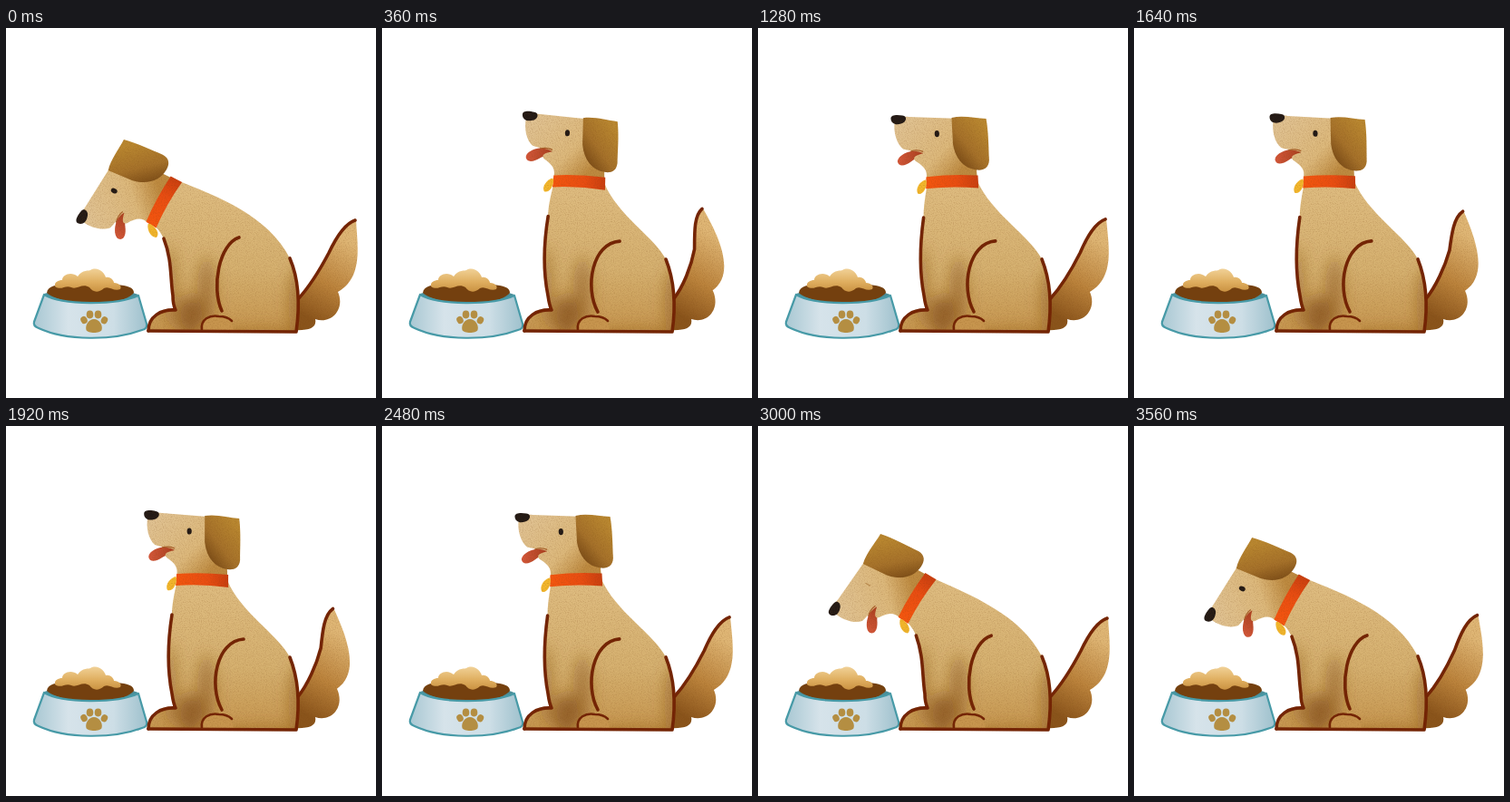
Recreate the animation shown at these times as an HTML page. Size 408x408 px, loop 3.6 s.

```html
<!DOCTYPE html>
<html lang="en">
<head>
<meta charset="utf-8">
<title>Dog and bowl</title>
<style>
html, body { margin: 0; width: 100%; height: 100%; overflow: hidden; background: #fff; }
svg { display: block; width: 100vw; height: 100vh; }
.line { fill: none; stroke: #742405; stroke-width: 3.6; stroke-linecap: round; stroke-linejoin: round; }
.soft { filter: url(#blur); }
</style>
</head>
<body>
<svg viewBox="0 0 408 408">
  <defs>
    <filter id="blur" x="-60%" y="-60%" width="220%" height="220%"><feGaussianBlur stdDeviation="8"/></filter>
    <filter id="grain" filterUnits="userSpaceOnUse" x="0" y="0" width="408" height="408" color-interpolation-filters="sRGB">
      <feTurbulence type="fractalNoise" baseFrequency="0.9" numOctaves="2" seed="4"/>
      <feColorMatrix values="0 0 0 0 .45  0 0 0 0 .25  0 0 0 0 .05  .45 0 0 0 -.2"/>
      <feComposite in2="SourceAlpha" operator="in" result="dots"/>
      <feMerge><feMergeNode in="SourceGraphic"/><feMergeNode in="dots"/></feMerge>
    </filter>
    <linearGradient id="coat" x1="0" y1="165" x2="0" y2="335" gradientUnits="userSpaceOnUse">
      <stop offset="0" stop-color="#dfbd82"/><stop offset=".6" stop-color="#d5b06f"/><stop offset="1" stop-color="#c6964f"/>
    </linearGradient>
    <linearGradient id="face" x1="165" y1="100" x2="225" y2="160" gradientUnits="userSpaceOnUse">
      <stop offset="0" stop-color="#e0c292"/><stop offset=".65" stop-color="#dcb87b"/><stop offset="1" stop-color="#bd8a40"/>
    </linearGradient>
    <linearGradient id="earFill" x1="219" y1="140" x2="256" y2="112" gradientUnits="userSpaceOnUse">
      <stop offset="0" stop-color="#7d4e18"/><stop offset=".4" stop-color="#a5712a"/><stop offset="1" stop-color="#b98730"/>
    </linearGradient>
    <linearGradient id="tailFill" x1="330" y1="318" x2="378" y2="235" gradientUnits="userSpaceOnUse">
      <stop offset="0" stop-color="#8a541b"/><stop offset=".45" stop-color="#bb833c"/><stop offset="1" stop-color="#dfb675"/>
    </linearGradient>
    <linearGradient id="tongueFill" x1="186" y1="0" x2="157" y2="0" gradientUnits="userSpaceOnUse">
      <stop offset="0" stop-color="#a8401f"/><stop offset="1" stop-color="#d4573a"/>
    </linearGradient>
    <linearGradient id="strap" x1="187" y1="0" x2="245" y2="0" gradientUnits="userSpaceOnUse">
      <stop offset="0" stop-color="#f4560f"/><stop offset=".6" stop-color="#e94d12"/><stop offset="1" stop-color="#c93f10"/>
    </linearGradient>
    <linearGradient id="bowlFill" x1="31" y1="0" x2="156" y2="0" gradientUnits="userSpaceOnUse">
      <stop offset="0" stop-color="#a9c8d3"/><stop offset=".3" stop-color="#d6e3ea"/><stop offset=".7" stop-color="#cddee6"/><stop offset="1" stop-color="#9dc0cc"/>
    </linearGradient>
    <linearGradient id="cream" x1="0" y1="266" x2="0" y2="294" gradientUnits="userSpaceOnUse">
      <stop offset="0" stop-color="#f0d095"/><stop offset=".5" stop-color="#dfae5f"/><stop offset="1" stop-color="#c48a3a"/>
    </linearGradient>
    <clipPath id="inBody"><use href="#body"/></clipPath>
  </defs>

  <g id="bowl">
    <path d="M42 293C70 285 120 285 146 294L144 303C110 308 70 306 43 299Z" fill="#4b8f9a"/>
    <path d="M45 292C46 284 56 283 66 283H122C134 284 141 286 141 292C128 308 62 307 45 292Z" fill="#74400f"/>
    <path d="M54 285C53 280 58 278 62 278C62 272 72 268 79 274C84 266 92 268 93 267C101 262 109 270 110 275C116 274 119 279 119 281C125 281 128 285 126 288C119 291 114 284 108 287C101 293 96 291 92 286C84 281 78 289 72 286C65 283 61 290 54 285Z" fill="url(#cream)"/>
    <path d="M42 294C62 306 122 306 146 295L155 326C156 330 154 332 150 333C118 345 66 345 36 331C31 329 30 327 31 324Z"
      fill="url(#bowlFill)" stroke="#479aa7" stroke-width="2.2" stroke-linejoin="round"/>
    <g fill="#b48e42">
      <path d="M97 321C103 321 107 328 105.500 333C104 337 90 337 88.500 333C87 328 91 321 97 321Z"/>
      <ellipse cx="86" cy="322" rx="3.6" ry="4.2" transform="rotate(-25 86 322)"/>
      <ellipse cx="92.500" cy="316" rx="3.8" ry="4.4"/>
      <ellipse cx="101.500" cy="316" rx="3.8" ry="4.4"/>
      <ellipse cx="108.500" cy="322" rx="3.6" ry="4.2" transform="rotate(25 108 322)"/>
    </g>
  </g>

  <g filter="url(#grain)">
    <path id="tail" fill="url(#tailFill)"/>
    <path id="tailLine" class="line"/>

    <path id="body" fill="url(#coat)"/>
    <g clip-path="url(#inBody)">
      <g class="soft" fill="#85501a">
        <ellipse cx="322" cy="305" rx="10" ry="42" opacity=".5"/>
        <ellipse cx="221" cy="290" rx="10" ry="38" opacity=".5"/>
        <ellipse cx="203" cy="318" rx="14" ry="22" opacity=".75"/>
        <ellipse cx="181" cy="285" rx="7" ry="45" opacity=".45"/>
        <ellipse cx="280" cy="340" rx="50" ry="8" opacity=".4"/>
      </g>
    </g>
    <path d="M217 334C213 321 225 315 237 318C245 320 250 325 251 334Z" fill="#c7954e"/>
    <path id="chest" class="line"/>
    <path id="rump" class="line"/>
    <path id="thigh" class="line"/>
    <path class="line" d="M216 333C214 321 225 316 235 318Q244 318 249 323" style="stroke-width:2.6"/>

    <g id="head">
      <g id="tongue"><path d="M186 134C174 131 158 136 157 144C158 151 166 149 172 145C178 141 184 141 187 139Z" fill="url(#tongueFill)"/></g>
      <path d="M156 101C158 95 166 95 172 96L222 100L243 130L244 166H188C190 156 187 152 177 145C174 142 175 139 186 137C180 133 172 134 164 131C157 125 154 112 156 101Z" fill="url(#face)"/>
      <path d="M186 135Q180 132 172 134" fill="none" stroke="#a9602a" stroke-width="1.2"/>
      <path d="M152 97C152 92 160 93 165 94C171 95 169 102 163 103C157 105 152 102 152 97Z" fill="#231a16"/>
      <ellipse id="eye" cx="202" cy="116" rx="2.6" ry="3.6" fill="#231a16"/>
      <path id="lid" d="M202 113V119" stroke="#b98a4e" stroke-width="1.2"/>
      <path id="ear" d="M219 99C232 97 245 101 257 102C259 118 258 134 258 148C257 157 251 159 244 158C231 156 221 146 219 128Z" fill="url(#earFill)"/>
      <path d="M188 163Q216 161 245 164L245 178Q216 174 187 176Z" fill="url(#strap)"/>
      <path d="M187 166C180 168 175 176 178 181C183 183 188 176 188 168Z" fill="#f2b62c"/>
    </g>
  </g>
</svg>
<script>
const LOOP = 3600, STEP = 60, DOWN = -62;
const PIVOT = [213, 216], TAIL_ROOT = [322, 325], TAIL_HEIGHT = 114;
const $ = id => document.getElementById(id);
const set = (id, name, value) => $(id).setAttribute(name, value);

// Time tracks: [ms, value] pairs
const wag = [[0, 0], [60, 1], [120, 12], [180, 18.3], [240, 21], [300, 20], [420, 11], [540, 3.3], [600, 0]];
const nod = [[0, -3.6], [60, -2.7], [120, .1], [180, .1], [300, 0], [450, -1.5], [600, -3.6]];
const pose = [[0, -62.5], [60, -62], [120, -57], [180, -44], [240, -26], [300, -10], [360, 2], [420, 7], [480, 6],
  [600, 2], [720, 0], [2520, 0], [2580, -4], [2640, -14], [2700, -29], [2760, -45], [2820, -56], [2880, -60],
  [3000, -59.5], [3120, -61], [3300, -62], [3600, -62.5]];

function track(keys, t) {
  const i = Math.max(1, keys.findIndex(k => k[0] >= t));
  const [t0, a] = keys[i - 1], [t1, b] = keys[i];
  return a + (b - a) * (t - t0) / (t1 - t0);
}

function spin(x, y, deg, [cx, cy]) {
  const a = deg * Math.PI / 180, c = Math.cos(a), s = Math.sin(a);
  return [cx + (x - cx) * c - (y - cy) * s, cy + (x - cx) * s + (y - cy) * c];
}

// Blend two paths of the same structure
function blend(a, b, k) {
  const ends = b.match(/[\d.]+/g);
  let i = 0;
  return a.replace(/[\d.]+/g, n => (+n + (ends[i++] - n) * k).toFixed(2));
}

// Rotate the tail about its root, more towards the tip
function bend(path, deg) {
  return path.replace(/([\d.]+) ([\d.]+)/g, (_, x, y) => {
    const high = Math.max(0, TAIL_ROOT[1] - y) / TAIL_HEIGHT;
    return spin(+x, +y, -deg * high ** 1.6, TAIL_ROOT).map(v => v.toFixed(2)).join(' ');
  });
}

const tailEdge = 'M322 299 C334 286 347 265 356 248 C364 231 373 216 385 212';
const tailShape = 'M316 332 L322 299 C334 286 347 265 356 248 C364 231 373 216 386 211 C387 237 395 275 366 291 C374 309 360 327 341 321 C343 331 334 334 316 333Z';
const chest = ['M183 208C178 240 178 270 183 295', 'M174 232C183 255 181 275 184 295'];
const paw = 'C184 302 185 307 187 311C171 310 157 318 157 334';
const rump = ['C325 300 321 275 313 255', 'C325 300 322 275 313 254'];
const nape = ['C300 230 258 205', 'C290 208 235 186'];
const throat = ['C184 190 183 200', 'C168 221 171 226'];
const thigh = ['M262 235C232 237 223 286 238 313', 'M257 231C235 238 226 286 238 312'];

function draw(t) {
  const beat = t % 600;
  const base = track(pose, t);
  const up = Math.min(1, Math.max(0, 1 + base / 30));
  const angle = base + track(nod, beat) * up;
  const k = Math.min(1.05, angle / DOWN);
  const mix = pair => blend(...pair, k);

  set('head', 'transform', `rotate(${angle} ${PIVOT})`);
  set('ear', 'transform', `rotate(${-5 * k} 228 100)`);
  set('tongue', 'transform', `rotate(${-1.5 * Math.cos(beat / 300 * Math.PI)} 186 137)`);
  const shut = t >= 2940 && t <= 3060;
  set('eye', 'opacity', shut ? 0 : 1);
  set('lid', 'opacity', shut ? 1 : 0);

  const front = spin(189, 170, angle, PIVOT).join(' ');
  const back = spin(244, 170, angle, PIVOT).join(' ');
  const leg = mix(chest), spine = mix(rump);
  const legTop = leg.slice(1, leg.indexOf('C'));
  set('body', 'd', `${leg}${paw}L320 335${spine}${mix(nape)} ${back}L${front}${mix(throat)} ${legTop}Z`);
  set('chest', 'd', leg + paw);
  set('rump', 'd', `M157 334L320 335${spine}`);
  set('thigh', 'd', mix(thigh));

  const sway = track(wag, beat);
  set('tail', 'd', bend(tailShape, sway));
  set('tailLine', 'd', bend(tailEdge, sway));
}

// Poses fall on 60 ms steps, shown for 80 and 40 ms in turn
function frame() {
  const t = performance.now() % LOOP;
  const n = Math.floor(t / 120) * 2 + (t % 120 >= 80 ? 1 : 0);
  draw(n * STEP);
  requestAnimationFrame(frame);
}
frame();
</script>
</body>
</html>
```
